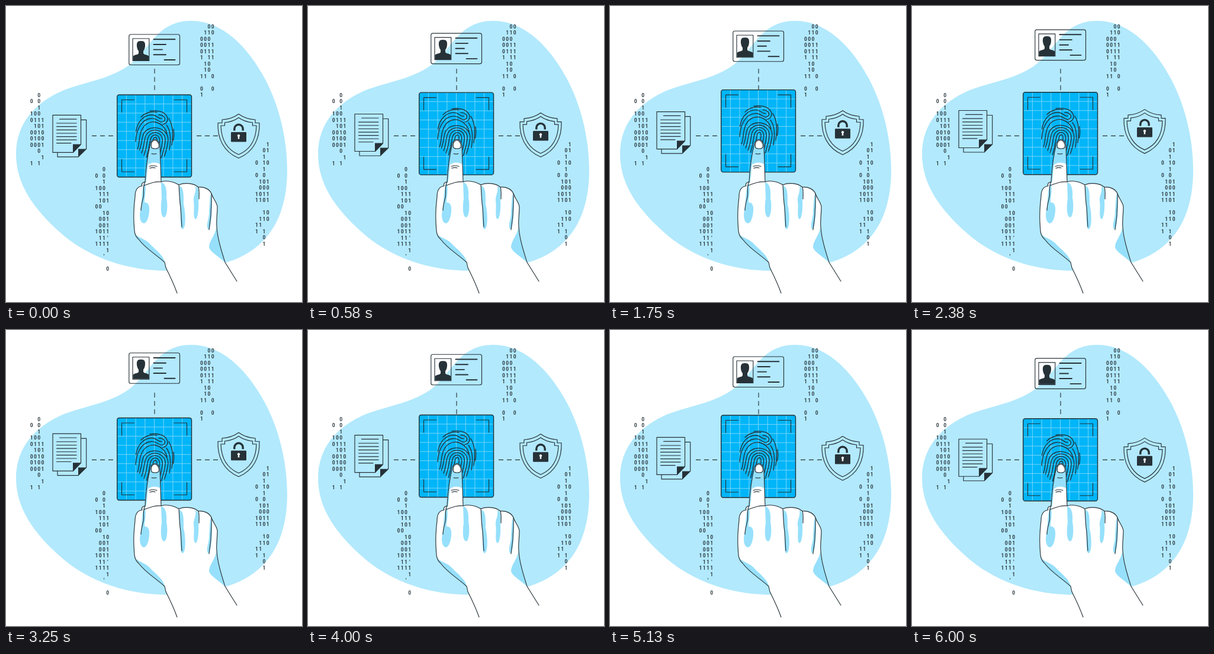
Animation of 500 by 500 pixels, one loop 6.04 s. Source, as an HTML page:

```html
<!DOCTYPE html>
<html lang="en">
<head>
<meta charset="utf-8">
<title>Fingerprint access</title>
<style>
html, body { margin: 0; width: 100%; height: 100%; overflow: hidden; background: #fff; }
svg { display: block; width: 100vw; height: 100vh; }
.line { fill: none; stroke: #263238; stroke-width: 1.15; stroke-linecap: round; stroke-linejoin: round; }
.dark { fill: #263238; }
.shade { fill: #96e0fc; }
#bits { font: 500 9.8px "Roboto Condensed", "Liberation Sans Narrow", Roboto, sans-serif; font-stretch: 75%; text-anchor: middle; fill: #263238; }
</style>
</head>
<body>
<svg viewBox="0 0 500 500">
  <defs><clipPath id="oval"><ellipse cx="251" cy="218" rx="33" ry="42"/></clipPath></defs>

  <path fill="#b2e9fd" d="M313 25C365 25 408 68 438 124C462 170 475 225 475 277C475 355 444 412 370 434C340 444 300 449 262 447C195 445 133 420 92 383C48 344 17 302 17 250C17 198 50 162 98 142C135 128 172 124 205 102C243 76 253 25 313 25Z"/>
  <g id="bits"></g>
  <path class="line" style="stroke-linecap:butt" stroke-dasharray="8 6" d="M251 106V142M145 219.3H181M322 219.3H358"/>

  <g id="panel">
    <rect x="187.7" y="150" width="125.8" height="139" rx="3.5" fill="#00b5f8"/>
    <path id="grid" fill="none" stroke="#79d6fb" stroke-width="1"/>
    <rect class="line" x="187.7" y="150" width="125.8" height="139" rx="3.5" style="stroke-width:1.4"/>
    <path class="line" d="M195.5 179.5V158.5H216.5M284 158.5H305.5V179.5M195.5 259V280H216.5M284 280H305.5V259"/>
    <g class="line" style="stroke-width:1.35">
      <g clip-path="url(#oval)"><path id="ridges" transform="rotate(8 252 225)"/></g>
      <path d="M222 242C226 233 224 221 229 210C234 199 242 195 252 196C262 198 270 206 272 216"/>
      <path d="M219 229C220 209 229 191 245 190C256 189 259 199 266 195C272 190 266 184 258 184"/>
      <path d="M219.500 212C222 195 233 184 246 184C255 184 257 191 263 190"/>
      <path d="M228 187.500C236 179 248 178 255 179.500M243 177.500C258 175 269 180 272 187C275 193 271 199 265 200"/>
      <path d="M275 190C282 202 283 215 280 235M271 201C278 210 279 225 276 243M283 208Q284.500 218 282.500 227"/>
    </g>
  </g>

  <g id="icons">
    <rect class="line" x="207.800" y="48" width="85.700" height="51.500" rx="3"/>
    <rect class="line" x="214" y="55" width="27.800" height="37.500"/>
    <path class="dark" d="M214.500 92V85C217 82 223 82.500 224 80V76C222.500 74.500 222 72.500 221.300 70C220 62 222 59 228 59S236 62 234.700 70C234 72.500 233.500 74.500 232 76V80C233 82.500 239 82 241.500 85V92Z"/>
    <path class="line" style="stroke-width:1.9" d="M249.500 56.200H285.500M249.500 65H270M249.500 73.600H264M249.500 82.200H270M267.500 91H285.500"/>

    <g transform="translate(0 .4)">
      <path class="line" d="M126.500 192H135.700V241L122 254.500H87V247.500M79 184H126.500V233.500L113.500 247H79Z"/>
      <path class="dark" d="M113 233H127L113 247.500ZM122 241H136.200L122 255Z"/>
      <path class="line" d="M90.500 190.800H119M85.500 197.600H119M85.500 203.300H119M85.500 209H119M85.500 214.600H119M85.500 220.200H119M85.500 225.800H119M85.500 231.300H110"/>
    </g>

    <path class="line" d="M393 182.500C402 189 411 191.500 421 192V197.500H428C429 223 419 246 393 257C367 246 357 223 358 197.500H365V192C375 191.500 384 189 393 182.500Z"/>
    <path class="line" d="M393 188.500C400 194 408 196 416.500 197V202H423C422.500 224 414 242 393 251C372 242 363.500 224 363 202H369.500V197C378 196 386 194 393 188.500Z"/>
    <path class="line" style="stroke-width:3.400;stroke-linecap:butt" d="M385.800 210.500V207.500A7.200 7.200 0 0 1 400.200 207.500V210.500"/>
    <rect class="dark" x="380" y="213" width="26" height="16.500" rx="1.300"/>
    <path fill="#fff" d="M391.900 220.800A2.100 2.100 0 1 1 394.100 220.800L394.400 224.500H391.600Z"/>
  </g>

  <g>
    <path id="hand" fill="#fff"/>
    <g class="shade">
      <path d="M243 236C244 222 259 222 260 236L261.500 268C253 263 246 264 240 268C238 278 239 288 236 299C233 299 235 297 235 294C236 275 238 258 243 236Z"/>
      <path d="M234 299C238 308 234 322 234 332C240 331 243 337 242 347C241 359 237 368 232 367C225 364 225 351 228 340C230 328 228 312 234 299Z"/>
      <path d="M262 298C269 299 272 308 271 324C274 338 272 357 267 357C261 356 261 338 263 326Z"/>
      <path d="M292 304C301 304 300 322 300 335C304 351 304 377 298 377C293 375 296 351 294 338Z"/>
      <path d="M320 304C327 307 326 317 325 328C326 343 324 360 320 360C315 357 319 341 317 330C316 320 322 315 320 304Z"/>
      <path d="M345 318C349 326 348 345 347 356C346 369 344 378 341 377C337 370 344 358 343 346Z"/>
      <path d="M355 374C354 387 342 398 343 408C346 416 359 423 370 433C364 414 357 392 355 374Z"/>
      <path d="M219 386C228 394 236 393 246 405C257 415 267 424 268 433C250 417 236 410 224 394Z"/>
    </g>
    <path class="line" style="fill:#fff" d="M245.300 238C243.500 223 259 223 258.300 238C257 242 246.500 242 245.300 238Z"/>
    <path id="outline" class="line"/>
    <path class="line" d="M262 297C253 296 245 299 234 303M235 297C230 305 234 314 232 323C230 331 228 338 228 345M292 302C293 316 293 329 295 340L297 373M325 306C327 313 326 320 326 326M347 317C348 330 346 342 346 354L343 378M246 249.500Q250 250.500 254 249.500M242 271Q248 268.500 255 271M243 274Q248 272 252 273.500"/>
  </g>
</svg>
<script>
const $ = id => document.getElementById(id);

// Columns of binary digits: left, first baseline, rows
const blocks = [
  [43.2, 153.9, "  0|0 0|  1|100|0111| 101|0010|0100|0001|  0|   1|1 1"],
  [330.5, 37.9, "  00| 110|000|0011|0111|1 11| 10| 10|11 0||0  0|1"],
  [153, 279.4, "  0|0 0|  1|100| 111| 101|00|  10| 001| 001|1011| 11'|1111|   1|  '||   0"],
  [423.5, 237, "   1|  01|  1|0 10|  1|0 0| 101| 000|1011|1101||  10| 110|11|1 1|  0|  1"]
];
$("bits").innerHTML = blocks.map(([x, y, rows]) =>
  rows.split("|").map((row, r) => [...row].map((c, i) => c === " " ? "" :
    `<text x="${x + i * 6.25}" y="${y + r * 10.47}">${c}</text>`).join("")).join("")).join("");

let grid = "", ridges = "";
for (let i = 1; i < 8; i++) grid += `M${187.7 + i * 15.7} 150.7V288.300`;
for (let i = 1; i < 9; i++) grid += `M188.4 ${150 + i * 15.45}H312.8`;
for (let k = 0; k < 5; k++) {
  const w = 3.5 + k * 4.6, top = 221 - k * 5, mid = 230 - k;
  const [l, r] = [252 - w, 252 + w], flare = 2 + k * 1.5;
  ridges += `M${l - flare} 268Q${l} 250 ${l} ${mid}C${l} ${top - 2} ${r} ${top - 2} ${r} ${mid}Q${r} 250 ${r - flare} 268`;
}
$("grid").setAttribute("d", grid);
$("ridges").setAttribute("d", ridges);

const hand = "M289 485C283 468 277 456 270 442L268 433C250 417 236 410 224 394C216 387 217 379 216 365C215 344 217 333 218 322C218 312 221 305 230 304C228 300 231 298 235 297C236 278 238 258 243 236C244 222 259 222 260 236L262 297C272 294 283 297 292 302C302 298 317 299 325 306C334 305 344 309 347 317C350 326 356 331 357 339C357 352 355 362 356 373C357 392 364 414 370 433L390 465";
$("hand").setAttribute("d", hand + "Z");
$("outline").setAttribute("d", hand);

// Linear bob: 0 to 10 px up and back within one period
const bob = (t, period) => -10 * (1 - Math.abs(1 - 2 * (t % period) / period));
const shift = (id, y) => $(id).setAttribute("transform", `translate(0 ${y})`);
const start = performance.now();

function draw(now) {
  const t = Math.max(0, now - start);
  shift("panel", bob(t, 3020));
  shift("icons", bob(t, 6040));
  requestAnimationFrame(draw);
}
draw(start);
</script>
</body>
</html>
```
